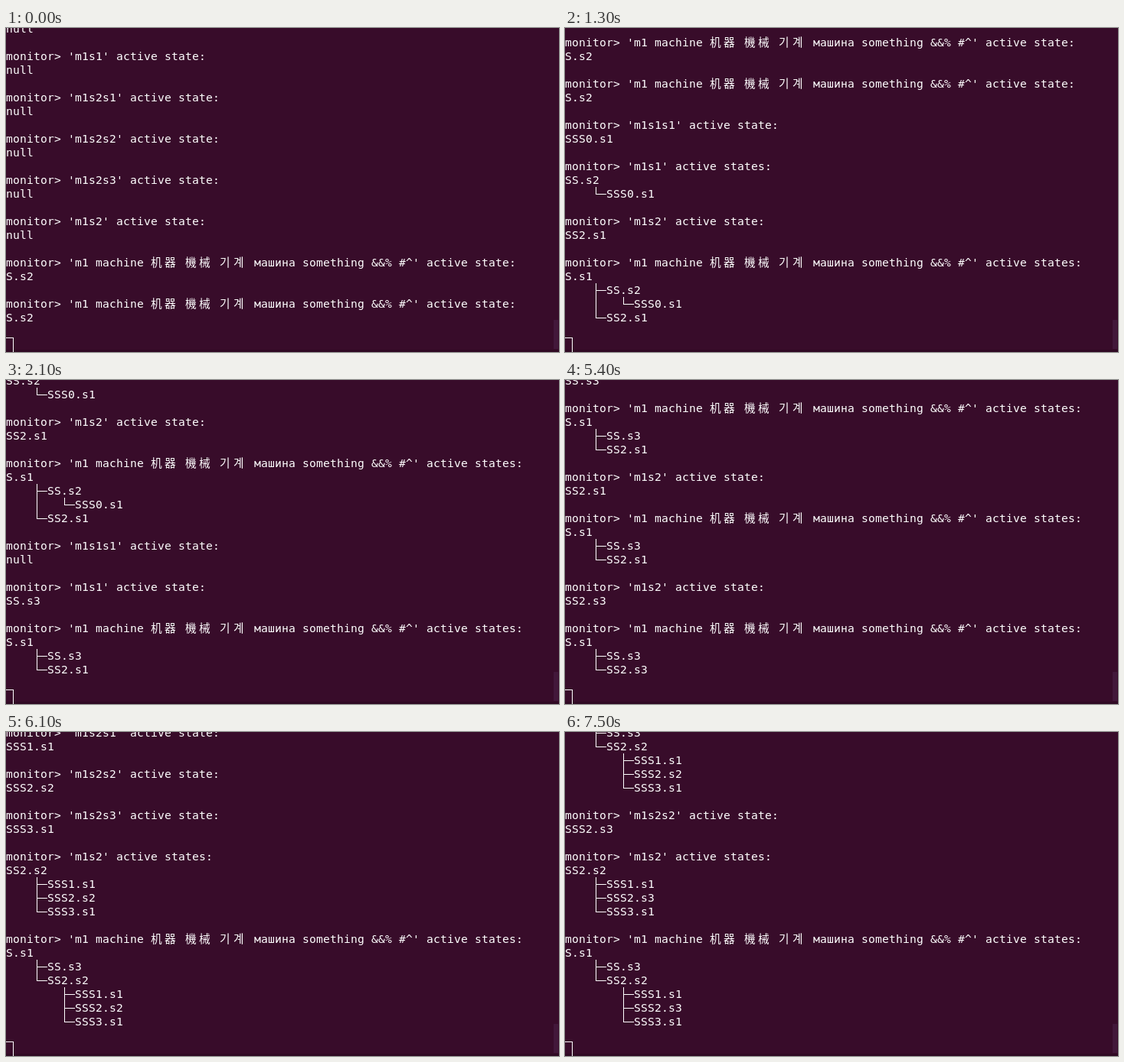
Recreate the animation shown at these times as an HTML page with a canvas. Size 722 by 424 pixels, loop 8 s.

```html
<!DOCTYPE html>
<html lang="en">
<head>
<meta charset="utf-8">
<title>State machine monitor</title>
<style>
html, body { margin: 0; width: 100%; height: 100%; overflow: hidden; background: #380c2a; }
canvas { display: block; }
</style>
</head>
<body>
<canvas id="term" width="722" height="424"></canvas>
<script>
const ctx = document.getElementById('term').getContext('2d');
const LOOP = 8000, COL = 9, ROW = 18, TOP = -8, BASE = 14, ROWS = 23;
const FONT = '14.667px "DejaVu Sans Mono", "Noto Sans CJK SC", "Noto Sans CJK JP", "Noto Sans CJK KR", monospace';
const MAIN = 'm1 machine 机器 機械 기계 машина something &&% #^';

// Lines of a state with its active substates as a tree
function tree(name, ...kids) {
  const lines = [name];
  kids.forEach((kid, i) => {
    const last = i === kids.length - 1;
    const [head, ...rest] = [].concat(kid);
    lines.push('    ' + (last ? '└─' : '├─') + head);
    for (const line of rest) lines.push('    ' + (last ? ' ' : '│') + line.slice(1));
  });
  return lines;
}

function report(id, state) {
  const lines = [].concat(state);
  const noun = lines.length > 1 ? 'states' : 'state';
  return [`monitor> '${id}' active ${noun}:`, ...lines, ''];
}

const idle = id => report(id, 'null');
const main = (...kids) => report(MAIN, tree('S.s1', ...kids));

const ss = tree('SS.s2', 'SSS0.s1');
const ss2 = n => tree('SS2.s2', 'SSS1.s1', 'SSS2.s' + n, 'SSS3.s1');
const ss2Change = n => [report('m1s2', ss2(n)), main('SS.s3', ss2(n))];

const events = [
  [0, ...['m1s1s1', 'm1s1', 'm1s2s1', 'm1s2s2', 'm1s2s3', 'm1s2'].map(idle),
    report(MAIN, 'S.s2'), report(MAIN, 'S.s2')],
  [1300, report('m1s1s1', 'SSS0.s1'), report('m1s1', ss), report('m1s2', 'SS2.s1'), main(ss, 'SS2.s1')],
  [2100, idle('m1s1s1'), report('m1s1', 'SS.s3'), main('SS.s3', 'SS2.s1')],
  [3700, report('m1s2', 'SS2.s1'), main('SS.s3', 'SS2.s1')],
  [5400, report('m1s2', 'SS2.s3'), main('SS.s3', 'SS2.s3')],
  [6100, report('m1s2s1', 'SSS1.s1'), report('m1s2s2', 'SSS2.s2'), report('m1s2s3', 'SSS3.s1'), ...ss2Change(2)],
  [6800, report('m1s2s2', 'SSS2.s2'), ...ss2Change(2)],
  [7500, report('m1s2s2', 'SSS2.s3'), ...ss2Change(3)]
];

// Each screen holds the last rows of the log at its time
const log = [];
const screens = events.map(([time, ...reports]) => {
  log.push(...reports.flat());
  return { time, lines: log.slice(-ROWS) };
});

const isWide = ch => /[\u1100-\u11ff\u3000-\u9fff\uac00-\ud7af]/.test(ch);

function drawChar(ch, x, y) {
  const cx = x + 4, cy = y + 9;
  if (ch === '─') ctx.fillRect(x, cy, COL, 1);
  else if ('│├└'.includes(ch)) {
    ctx.fillRect(cx, y, 1, ch === '└' ? 10 : ROW);
    if (ch !== '│') ctx.fillRect(cx, cy, 5, 1);
  } else if (ch !== ' ') ctx.fillText(ch, x, y + BASE);
}

function drawLine(line, y) {
  let x = 0;
  for (const ch of line) {
    drawChar(ch, x, y);
    x += isWide(ch) ? 2 * COL : COL;
  }
}

function draw(lines) {
  ctx.fillStyle = '#380c2a';
  ctx.fillRect(0, 0, 722, 424);
  ctx.fillStyle = '#300a24';
  ctx.fillRect(0, 421, 722, 3);
  ctx.fillStyle = '#42183a';
  ctx.fillRect(715, 382, 6, 38);

  ctx.fillStyle = '#fff';
  ctx.font = FONT;
  ctx.textBaseline = 'alphabetic';
  lines.forEach((line, i) => drawLine(line, TOP + i * ROW));

  // Hollow cursor, one pixel outside its cell
  ctx.strokeStyle = '#fff';
  ctx.lineWidth = 1;
  ctx.strokeRect(-0.5, TOP + ROWS * ROW - 0.5, COL + 1, ROW + 1);
}

const start = performance.now();
let shown = null;
function tick() {
  const t = (performance.now() - start) % LOOP;
  const screen = screens.filter(s => s.time <= t).pop();
  if (screen !== shown) draw((shown = screen).lines);
  requestAnimationFrame(tick);
}
tick();
</script>
</body>
</html>
```
